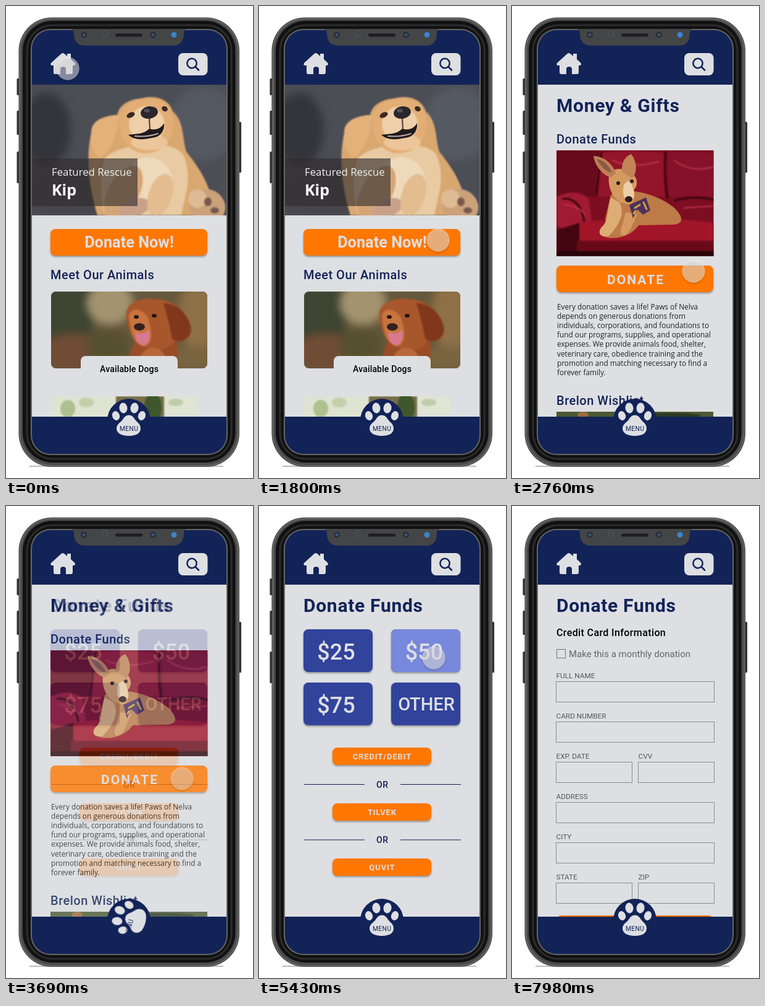
An HTML page that plays this animation: 400 by 762 pixels, repeating every 8000 ms.

```html
<!DOCTYPE html>
<html lang="en">
<head>
<meta charset="utf-8">
<title>Animal rescue app</title>
<style>
  html, body { margin: 0; width: 100%; height: 100%; overflow: hidden; background: #fff; }
  svg { display: block; width: 100vw; height: 100vh; }
  text { font-family: Roboto, sans-serif; fill: #122358; white-space: pre; }
  .open { font-family: "Open Sans", sans-serif; }
  .soft { filter: blur(1.2px); }
  .haze { filter: blur(7px); }
  .raised { filter: drop-shadow(0 2px 1.5px rgba(0, 0, 0, .35)); }
  #paw { transform-origin: 198.5px 666px; }
  #menu { transform-origin: 199px 682px; }
</style>
</head>
<body>
<svg id="stage" viewBox="0 0 400 762"></svg>
<script>
const LOOP = 8000;
const NAVY = '#122358', PAPER = '#dedfe2', ORANGE = '#ff7700', BLUE = '#31439b';

const attrs = o => Object.entries(o).map(([k, v]) => `${k}="${v}"`).join(' ');
const box = (x, y, w, h, fill, more = {}) =>
  `<rect ${attrs({ x, y, width: w, height: h, fill, ...more })}/>`;
const oval = (cx, cy, rx, ry, fill, turn = 0) =>
  `<ellipse ${attrs({ cx, cy, rx, ry, fill, transform: `rotate(${turn} ${cx} ${cy})` })}/>`;
const path = (d, fill, more = {}) => `<path ${attrs({ d, fill, ...more })}/>`;
const line = (d, stroke, width) =>
  path(d, 'none', { stroke, 'stroke-width': width, 'stroke-linecap': 'round' });
const text = (x, y, size, words, more = {}) =>
  `<text ${attrs({ x, y, 'font-size': size, ...more })}>${words}</text>`;
const group = (cls, ...parts) => `<g class="${cls}">${parts.join('')}</g>`;
const clip = (id, ...parts) => `<g clip-path="url(#${id})">${parts.join('')}</g>`;
const area = (id, x, y, w, h, rx = 0) =>
  `<clipPath id="${id}">${box(x, y, w, h, '#000', { rx })}</clipPath>`;

const title = words => text(72, 171, 30, words, { 'font-weight': 700, 'letter-spacing': .7 });
const heading = (y, words) => text(72, y, 20, words, { 'font-weight': 500, 'letter-spacing': .5 });
const button = (x, y, w, h, fill) => box(x, y, w, h, fill, { rx: 8, class: 'raised' });
const label = (x, y, size, words, spacing = 0, weight = 700, fill = PAPER) =>
  text(x + spacing / 2, y, size, words,
    { 'text-anchor': 'middle', 'letter-spacing': spacing, 'font-weight': weight, style: `fill:${fill}` });
const page = (id, ...parts) =>
  `<g id="${id}">${box(42, 127, 315, 537, PAPER)}${parts.join('')}</g>`;

const heroPhoto = clip('hero',
  box(42, 127, 315, 211, '#4c4e56'),
  group('haze',
    oval(65, 200, 40, 60, '#34353b'), oval(110, 300, 90, 40, '#47454a'),
    oval(320, 190, 55, 60, '#555962')),
  group('soft',
    path('M148 338C132 285 130 240 138 205C140 185 160 177 180 176C184 156 205 150 220 149C243 143 264 151 270 170C289 187 285 212 292 235C311 259 334 290 338 338Z', '#d9a870'),
    path('M138 205C137 183 163 176 184 176C180 202 174 230 153 246C142 238 135 222 138 205Z', '#e3b27a'),
    path('M160 246C185 220 274 214 288 242C303 280 288 310 284 338H160C151 304 151 270 160 246Z', '#e9cba3'),
    path('M185 178C190 155 215 147 238 149C261 152 271 171 271 194C270 222 248 238 224 238C196 236 181 210 185 178Z', '#e2ae76'),
    oval(228, 191, 29, 29, '#efcfa9'), oval(232, 220, 30, 13, '#ecc69a'),
    oval(230, 286, 40, 42, '#efd9bb'),
    oval(190, 302, 25, 48, '#d5a577', 28), oval(208, 326, 26, 14, '#c9a18a', -20),
    oval(326, 323, 30, 27, '#cba17a', 30), oval(310, 311, 15, 15, '#dfbb95'),
    oval(327, 316, 6, 7, '#77594c'), oval(338, 330, 7, 5, '#77594c'),
    oval(250, 305, 19, 35, '#e3bd8f', 18)),
  path('M198 208C210 206 222 208 232 198C244 202 252 196 256 189C257 203 249 212 236 213C222 216 208 217 198 208Z', '#1f1a1d'),
  line('M209 210Q228 212 246 206', '#b9a69f', 2),
  oval(232, 172, 14, 10, '#29262c', -8), oval(228, 169, 5, 3, '#55525b'),
  line('M232 182L233 198', '#4a3730', 2),
  oval(202, 176, 7, 4, '#3b2922', -25), oval(257, 166, 5, 4, '#3b2922', 30));

const cardPhoto = clip('card',
  box(73, 461, 253, 124, '#66583c'),
  group('haze',
    box(65, 455, 75, 85, '#3d4431'), oval(110, 558, 55, 30, '#714c35'),
    oval(168, 480, 38, 35, '#a3936f'), oval(165, 550, 35, 30, '#57502f'),
    oval(312, 500, 35, 55, '#8e7047'), oval(300, 570, 50, 20, '#796440')),
  group('soft',
    path('M198 585C199 562 204 546 214 535L270 528C284 547 276 570 278 585Z', '#994d26'),
    path('M195 505C190 482 214 470 240 473C268 473 291 489 299 519C302 535 287 543 273 539C270 552 247 559 229 552C209 552 200 530 195 505Z', '#a8562b'),
    path('M255 480C282 480 298 503 300 523C297 540 281 546 269 537C266 518 261 500 255 480Z', '#81371b'),
    path('M199 500C202 486 220 487 230 503C238 528 237 546 225 549C207 547 202 528 199 500Z', '#c8743f'),
    oval(238, 570, 20, 18, '#b8693a')),
  path('M210 525C217 531 226 530 232 522C235 539 228 551 219 547C211 543 208 534 210 525Z', '#d87990'),
  oval(216, 518, 9, 6, '#32211e'), oval(211, 502, 4, 3, '#24150f'), oval(240, 500, 4, 3, '#24150f'));

const nextCard = clip('next',
  box(73, 630, 253, 33, PAPER),
  group('soft',
    box(73, 630, 105, 40, '#dfe3d2'), oval(100, 650, 12, 14, '#adc08e'), oval(130, 640, 12, 8, '#c3d0ab'),
    box(178, 630, 78, 40, '#776e48'), oval(238, 648, 14, 24, '#3f572c'),
    box(256, 630, 55, 29, '#dfe4d3'), oval(275, 640, 12, 6, '#bdcda8')));

const sofaPhoto = clip('sofa',
  box(72, 233, 255, 171, '#7d0d20'),
  group('soft',
    path('M72 233H142L132 308H72Z', '#670a1b'), path('M145 238Q190 230 245 238L247 308H140Z', '#93152a'),
    path('M252 238Q290 231 327 240V307H254Z', '#85122a'),
    path('M72 308Q102 293 124 310L130 352Q104 368 72 355Z', '#a01b32'),
    path('M108 350Q210 335 327 350V380H105Z', '#a21528'),
    path('M72 362L109 350V404H72Z', '#430611'), box(105, 379, 222, 25, '#690a18'),
    line('M249 235Q245 274 252 310M145 237L136 305M264 314Q295 305 327 313M83 311Q110 309 117 347', '#39050f', 3),
    line('M162 249Q194 264 238 251M262 249Q290 270 325 260M278 326L325 323M86 321Q108 323 119 337', '#bd344a', 2),
    line('M72 400H327', '#26030a', 8)),
  path('M160 305C181 290 235 302 263 326C282 345 275 354 255 353L205 354C191 374 165 377 151 373C143 370 155 357 151 343Z', '#bd7b48'),
  path('M174 317C184 335 173 354 157 371C145 375 137 367 145 357C157 348 154 328 160 309Z', '#ddad75'),
  path('M203 335C195 354 190 369 180 371C170 369 181 351 184 333Z', '#d59a62'),
  path('M157 274C160 263 176 259 188 268C204 273 206 289 197 297C201 313 195 323 184 319C169 318 154 298 157 274Z', '#d39a60'),
  path('M160 277C145 272 134 257 132 242C150 243 163 255 168 270Z', '#bd8054'),
  path('M178 268C177 250 184 243 193 239C204 253 202 270 195 278Z', '#c18557'),
  path('M137 247C150 249 158 259 162 269Q148 267 137 247Z', '#8d5946'),
  path('M181 289Q190 276 195 291Q203 312 189 316Q177 310 181 289Z', '#edcfa6'),
  oval(189, 312, 6, 5, '#2a1b1b'), oval(172, 286, 3, 3, '#2a1b1b'), oval(194, 283, 3, 3, '#2a1b1b'),
  path('M190 321L217 309L224 330L212 337L203 328L196 343Z', '#4d315a'),
  line('M199 326L207 321M213 317L218 328M197 335L200 331', '#d6a242', 3));

const story = [
  'Every donation saves a life! Paws of Nelva', 'depends on generous donations from',
  'individuals, corporations, and foundations to', 'fund our programs, supplies, and operational',
  'expenses. We provide animals food, shelter,', 'veterinary care, obedience training and the',
  'promotion and matching necessary to find a', 'forever family.'
].map((words, i) => text(73, 489.5 + i * 15.2, 11.8, words, { class: 'open', style: 'fill:#222' })).join('');

const home = page('home',
  heroPhoto,
  box(42, 246, 171, 77, '#302c2e', { opacity: .62 }),
  text(74, 274, 16.8, 'Featured Rescue', { class: 'open', style: 'fill:#f0f0f0' }),
  text(74, 306, 25, 'Kip', { class: 'open', 'font-weight': 700, style: 'fill:#fff' }),
  button(72, 360, 254, 43, ORANGE), label(199.5, 390, 25.3, 'Donate Now!'),
  heading(440.5, 'Meet Our Animals'),
  cardPhoto, box(121, 565, 157, 40, PAPER, { rx: 8 }),
  label(199.5, 591, 14, 'Available Dogs', .15, 500, '#000'),
  nextCard);

const gifts = page('gifts',
  title('Money &amp; Gifts'), heading(222, 'Donate Funds'), sofaPhoto,
  button(72, 419, 254, 43, ORANGE), label(199.5, 448.5, 21, 'DONATE', 2),
  story, heading(643.5, 'Brelon Wishlist'),
  box(72, 655, 254, 9, '#4b5a34'), oval(115, 660, 9, 5, '#9b6a3c'), oval(255, 661, 50, 4, '#2d3a24'));

const tile = (x, y, cx, base, size, words) =>
  button(x, y, 112, 69, BLUE) + label(cx, base, size, words, 0, 500);
const payment = (y, words) => button(119, y, 160, 28, ORANGE) + label(199, y + 18.7, 13, words, .9);
const divider = y =>
  box(73, y - .5, 98, 1, NAVY) + box(229, y - .5, 98, 1, NAVY) + label(199.5, y + 5, 14, 'OR', .5, 500, NAVY);

const funds = page('funds',
  title('Donate Funds'),
  tile(72, 199, 125, 248, 36, '$25'), tile(214, 199, 267.5, 248, 36, '$50'),
  `<g id="chosen">${box(214, 199, 112, 69, '#7888dc', { rx: 8 })}${label(267.5, 248, 36, '$50', 0, 500)}</g>`,
  tile(72, 285, 125, 334, 36, '$75'), tile(214, 285, 271, 330, 29, 'OTHER'),
  payment(390, 'CREDIT/DEBIT'), divider(449.5), payment(480, 'TILVEK'), divider(539), payment(569, 'QUVIT'));

const field = (row, words, x = 71.5, w = 256) =>
  text(x, 277.7 + row * 65, 11.8, words, { style: 'fill:#555' }) +
  box(x, 283.5 + row * 65, w, 33, 'none', { stroke: '#8b8c8f' });

const form = page('form',
  title('Donate Funds'),
  text(72, 210, 16, 'Credit Card Information', { 'font-weight': 500, 'letter-spacing': .38, style: 'fill:#000' }),
  box(72.5, 231.5, 14, 14, 'none', { stroke: '#777' }),
  text(92, 244, 15, 'Make this a monthly donation', { style: 'fill:#666' }),
  field(0, 'FULL NAME'), field(1, 'CARD NUMBER'),
  field(2, 'EXP. DATE', 71.5, 123), field(2, 'CVV', 204.5, 123),
  field(3, 'ADDRESS'), field(4, 'CITY'),
  field(5, 'STATE', 71.5, 123), field(5, 'ZIP', 204.5, 123),
  button(72, 661, 254, 20, ORANGE));

const header = box(40, 37, 320, 90, NAVY) +
  path('M92 76Q93.5 76 95 77.5L99 81V77H105V86L111.5 92Q113 96 109 96H108V107Q108 110 105 110H97V102Q97 98 92.500 98Q88 98 88 102V110H80Q77 110 77 107V96H75Q71 96 73 92L89 77.500Q90.500 76 92 76Z', PAPER) +
  box(279, 76, 47.5, 36, PAPER, { rx: 8 }) +
  `<circle cx="301" cy="92.500" r="7.700" fill="none" stroke="${NAVY}" stroke-width="2.500"/>` +
  line('M306.500 98L312 103.500', NAVY, 2.6);

const footer = box(40, 663, 320, 64, NAVY) + `<circle cx="199" cy="669" r="35" fill="${NAVY}"/>` +
  `<g id="paw">${oval(178, 661.5, 6, 7.5, PAPER, -18)}${oval(190, 649, 6.5, 8.5, PAPER, -8)}` +
  oval(208, 649, 6.5, 8.5, PAPER, 8) + oval(220, 661.5, 6, 7.5, PAPER, 18) +
  path('M199 660.500C205 660.500 207 665 210 669C214 673 218 676 218 682C218 689 212 694 199 694C186 694 179 689 179 682C179 676 184 673 188 669C191 665 193 660.500 199 660.500Z', PAPER) +
  `</g><g id="menu">${label(199, 685.5, 10.3, 'MENU', .35, 400, NAVY)}</g>`;

const lens = (x, y) => oval(x, y, 5, 5, '#2b2d33') + oval(x, y, 2.5, 2.5, '#36557d');
const sides = [[17.5, 117, 27], [17.5, 169, 39], [17.5, 235, 51], [376, 187, 82]]
  .map(([x, y, h]) => box(x, y, 5, h, '#333', { rx: 1.5 })).join('');
const shell = `<path d="M38 743H352" stroke="#bbb" stroke-width="2"/>` + sides +
  box(20.5, 18.5, 357.5, 725.5, '#4b4b4b', { rx: 54 }) +
  box(22.5, 20.5, 353.5, 721.5, 'none', { rx: 52, stroke: '#7b7b7b' }) +
  box(27, 24, 344.5, 713, '#111', { rx: 48 }) +
  box(34, 31, 331, 700, 'none', { rx: 41, stroke: '#2c2c2c', 'stroke-width': 3 }) +
  box(40, 37, 319, 688, '#656565', { rx: 32 });
const notch = path('M106 37Q110 39 110 44C110 57 116 64 129 64H270C282 64 288 57 288 44Q288 39 292 37Z', '#444546') +
  lens(126, 46.5) + lens(238, 46.5) + oval(272, 46.5, 4.5, 4.5, '#3b84cb') +
  box(177, 44.5, 44, 5, '#201d1e', { rx: 2.5 }) +
  box(157, 40, 7, 9, 'none', { rx: 2, stroke: '#56575a' });

const stage = document.getElementById('stage');
stage.innerHTML = `<defs>${area('screen', 42, 39, 315, 684, 30)}${area('hero', 42, 127, 315, 211)}` +
  area('card', 73, 461, 253, 124, 8) + area('next', 73, 630, 253, 33) + area('sofa', 72, 233, 254.5, 171) +
  `</defs>${shell}${clip('screen', home, gifts, funds, form, header, footer)}${notch}` +
  `<g id="touch"><circle r="18.500" fill="#faf7f5" fill-opacity=".5" stroke="#fff" stroke-opacity=".15" class="raised"/></g>`;

// Each step is [time in ms, properties, easing towards the next step].
const play = (id, steps) => document.getElementById(id).animate(
  steps.map(([t, props, easing = 'ease-in-out']) => ({ offset: t / LOOP, easing, ...props })),
  { duration: LOOP, iterations: Infinity });
const fade = (id, start, end) => play(id, [
  [0, { opacity: 0 }], [start, { opacity: 0 }], [end, { opacity: 1 }], [LOOP, { opacity: 1 }]]);

const changes = [['gifts', 1830, 2430], ['funds', 3500, 4100], ['form', 6650, 7250]];
changes.forEach(change => fade(...change));
fade('chosen', 5150, 5400);

const turn = n => ({ transform: `rotate(${-360 * n}deg)` });
const spin = [[0, turn(0)],
  ...changes.flatMap(([, start, end], i) => [[start, turn(i)], [end, turn(i + 1)]]),
  [LOOP, turn(changes.length)]];
play('paw', spin);
play('menu', spin);

play('touch', [
  [0, 100, 101], [250, 100, 101, 'ease-in'], [870, 212, 219, 'ease-out'], [1500, 290, 378],
  [2400, 290, 378, 'ease-in'], [2760, 294, 428, 'ease-out'], [3000, 285, 440],
  [4400, 285, 440], [5000, 283, 245], [5600, 283, 245], [6300, 253, 407],
  [7270, 253, 407], [7780, 116, 307], [LOOP, 116, 307]
].map(([t, x, y, easing]) => [t, { transform: `translate(${x}px, ${y}px)` }, easing]));
play('touch', [
  [0, 1], [3550, 1], [3950, 0], [4300, 0], [4500, 1], [7780, 1], [7950, 0], [LOOP, 0]
].map(([t, opacity]) => [t, { opacity }]));
</script>
</body>
</html>
```
